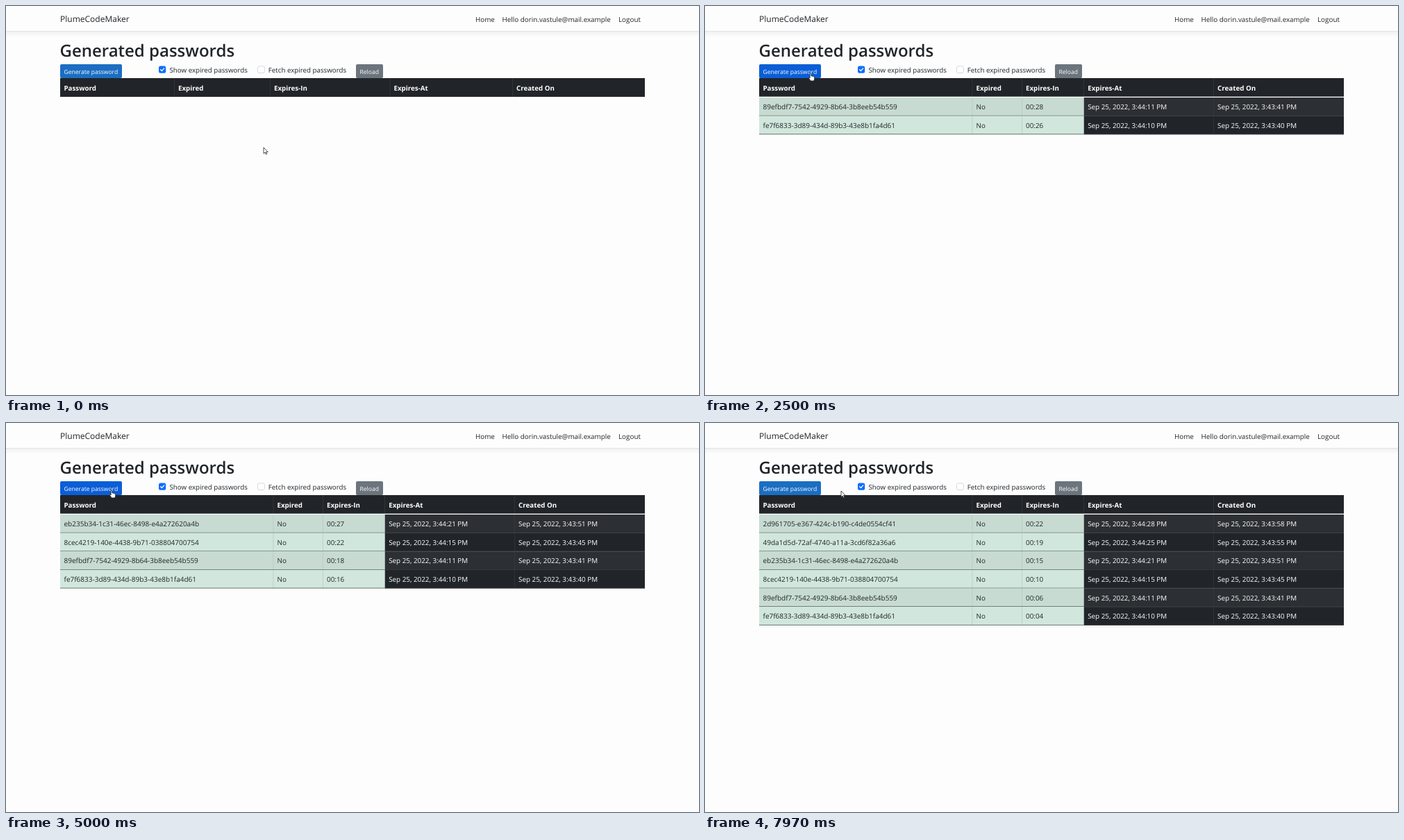
Recreate the animation shown at these times as an HTML page. Size 998 by 561 pixels, loop 8000 ms.

```html
<!DOCTYPE html>
<html lang="en">
<head>
<meta charset="utf-8">
<title>Generated passwords</title>
<style>
  html, body { margin: 0; width: 100%; height: 100%; overflow: hidden; background: #fdfdfd; }
  svg { display: block; width: 998px; height: 561px; }
  text {
    font: 9.85px "Open Sans", "Noto Sans", sans-serif;
    fill: #212529;
    text-rendering: geometricPrecision;
    white-space: pre;
  }
  .brand { font-size: 12px; }
  .title { font-size: 24px; font-weight: 600; }
  .label { font-size: 9.75px; }
  .button { font-size: 8.55px; fill: #fff; }
  .head { font-size: 9.75px; font-weight: 700; fill: #fff; }
  .code { font-size: 10px; }
  .light { fill: #fff; }
</style>
</head>
<body>
<svg viewBox="0 0 998 561">
  <defs>
    <linearGradient id="shade" x2="0" y2="1">
      <stop offset="0" stop-color="#000" stop-opacity=".045"/>
      <stop offset="1" stop-color="#000" stop-opacity="0"/>
    </linearGradient>
  </defs>

  <rect width="998" height="561" fill="#fdfdfd"/>
  <rect y="37" width="998" height="8" fill="url(#shade)"/>
  <rect y="36.2" width="998" height=".8" fill="#d9dce2"/>
  <text class="brand" x="78" y="23.2">PlumeCodeMaker</text>
  <text x="676" y="22.5">Home</text>
  <text x="714.5" y="22.5">Hello dorin.vastule@mail.example</text>
  <text x="882" y="22.5">Logout</text>

  <text class="title" x="77.5" y="73">Generated passwords</text>
  <rect id="ring" x="75.8" y="81.6" width="93.4" height="24.8" rx="4" fill="#9ac2fb"/>
  <rect id="generate" x="78" y="84" width="89" height="20" rx="2"/>
  <text class="button" x="83.5" y="97.5">Generate password</text>

  <rect x="220" y="86.5" width="10.2" height="10.2" rx="2.5" fill="#0d6efd"/>
  <path d="M222.7 91.8l1.8 1.8 3.2-3.7" fill="none" stroke="#fff" stroke-width="1.3" stroke-linecap="round" stroke-linejoin="round"/>
  <text class="label" x="235.5" y="95.5">Show expired passwords</text>
  <rect x="362.5" y="86.8" width="9.8" height="9.8" rx="2.3" fill="#fff" stroke="#c6c9d0" stroke-width=".7"/>
  <text class="label" x="377.8" y="95.5">Fetch expired passwords</text>
  <rect x="504" y="84" width="39" height="20" rx="2" fill="#6c757d"/>
  <text class="button" x="509.5" y="97.5">Reload</text>

  <g id="table"></g>

  <path id="arrow" d="M0 0V8.8L2.1 7 3.4 10 4.8 9.4 3.5 6.5H6.2Z" fill="#fff" stroke="#222" stroke-width=".8" stroke-linejoin="round"/>
  <path id="hand" d="M-.9 .9Q-.9 0 0 0T.9 .9V4Q2.3 3.4 2.6 4.4 4 3.9 4.3 4.9 5.7 4.6 5.7 6V8.2L4.8 11H.2L-2.5 7.2Q-3 6 -2 6L-.9 7Z" fill="#fff" stroke="#222" stroke-width=".8" stroke-linejoin="round"/>
</svg>
<script>
const LOOP = 8000, SECOND = 250;
const LEFT = 78, RIGHT = 920, TOP = 132, ROW = 26.62;
const HEADS = ["Password", "Expired", "Expires-In", "Expires-At", "Created On"];

// Column edges by number of rows; longer lists keep the last layout.
const COLUMNS = [
  [78, 242.5, 380.5, 553, 729.5],
  [78, 381.5, 453.5, 543.3, 731.3],
  [78, 385, 456.5, 545.7, 732.6]
];

// shown: time the row appears; zero: time its countdown would end
const ENTRIES = [
  { code: "fe7f6833-3d89-434d-89b3-43e8b1fa4d61", made: 40, shown: 1600, zero: 8880 },
  { code: "89efbdf7-7542-4929-8b64-3b8eeb54b559", made: 41, shown: 2060, zero: 9268 },
  { code: "8cec4219-140e-4438-9b71-038804700754", made: 45, shown: 2860, zero: 10275 },
  { code: "eb235b34-1c31-46ec-8498-e4a272620a4b", made: 51, shown: 4370, zero: 11635 },
  { code: "49da1d5d-72af-4740-a11a-3cd6f82a36a6", made: 55, shown: 5240, zero: 12535 },
  { code: "2d961705-e367-424c-b190-c4de0554cf41", made: 58, shown: 6100, zero: 13385 }
];

// time, x, y of the pointer
const PATH = [
  [0, 371, 204], [300, 371, 204], [830, 352, 194], [1250, 152, 97],
  [4270, 152, 97], [4320, 150, 97], [4350, 150, 97], [4400, 152, 97],
  [6500, 152, 97], [6800, 184.5, 98], [7970, 196, 98], [LOOP, 196, 98]
];

const $ = id => document.getElementById(id);
const two = n => String(n).padStart(2, "0");
const rect = (x, y, w, h, fill) => `<rect x="${x}" y="${y}" width="${w}" height="${h}" fill="${fill}"/>`;
const label = (x, y, words, kind = "") => `<text class="${kind}" x="${x}" y="${y}">${words}</text>`;
const clock = seconds => `Sep 25, 2022, 3:${43 + Math.floor(seconds / 60)}:${two(seconds % 60)} PM`;

function rowMarkup(entry, index, t, cols) {
  const y = TOP + index * ROW, striped = index % 2 === 0, split = cols[3];
  const left = Math.min(29, Math.ceil((entry.zero - t) / SECOND));
  const cells = [entry.code, "No", "00:" + two(left), clock(entry.made + 30), clock(entry.made)];
  return rect(LEFT, y, split - LEFT, ROW, striped ? "#c7dbd2" : "#d1e7dd")
    + rect(split, y, RIGHT - split, ROW, striped ? "#2c3034" : "#212529")
    + cols.slice(1, 3).map(x => rect(x - .4, y, .7, ROW, "#b5c9c0")).join("")
    + rect(cols[4] - .4, y, .7, ROW, "#373b3e")
    + rect(LEFT, y + ROW - .8, split - LEFT, .8, "#4d5c56")
    + rect(split, y + ROW - .8, RIGHT - split, .8, "#373b3e")
    + cells.map((words, i) =>
        label(cols[i] + 5.5, y + 17.1, words, i === 0 ? "code" : i > 2 ? "light" : "")).join("");
}

function tableMarkup(t) {
  const rows = ENTRIES.filter(entry => t >= entry.shown).reverse();
  const cols = COLUMNS[Math.min(rows.length, 2)];
  return rect(LEFT, 104, RIGHT - LEFT, 27, "#212529")
    + cols.slice(1).map(x => rect(x - .4, 104, .7, 27, "#373b3e")).join("")
    + HEADS.map((words, i) => label(cols[i] + 5.5, 121.5, words, "head")).join("")
    + (rows.length ? rect(LEFT, 130.7, RIGHT - LEFT, 1.3, "#fff") : "")
    + rows.map((entry, i) => rowMarkup(entry, i, t, cols)).join("");
}

function pointerAt(t) {
  const next = PATH.findIndex(point => point[0] > t);
  const [t0, x0, y0] = PATH[next - 1], [t1, x1, y1] = PATH[next];
  const k = (1 - Math.cos(Math.PI * (t - t0) / (t1 - t0))) / 2;
  return [x0 + (x1 - x0) * k, y0 + (y1 - y0) * k];
}

const show = (id, on) => $(id).setAttribute("visibility", on ? "visible" : "hidden");
let drawn = "";

function render(now) {
  const t = now % LOOP;
  const [x, y] = pointerAt(t);
  const hover = x < 167 && y < 104;
  const pending = span => ENTRIES.some(entry => t >= entry.shown - span && t < entry.shown);
  const pressed = pending(130), hand = hover && !pending(60);

  const markup = tableMarkup(t);
  if (markup !== drawn) $("table").innerHTML = drawn = markup;

  $("generate").setAttribute("fill", pressed ? "#0a58ca" : hover ? "#0b5ed7" : "#1b6ec2");
  show("ring", pressed);
  show("hand", hand);
  show("arrow", !hand);
  $(hand ? "hand" : "arrow").setAttribute("transform", `translate(${x} ${y})`);
}

const start = performance.now();
function tick() {
  render(performance.now() - start);
  requestAnimationFrame(tick);
}
tick();
</script>
</body>
</html>
```
